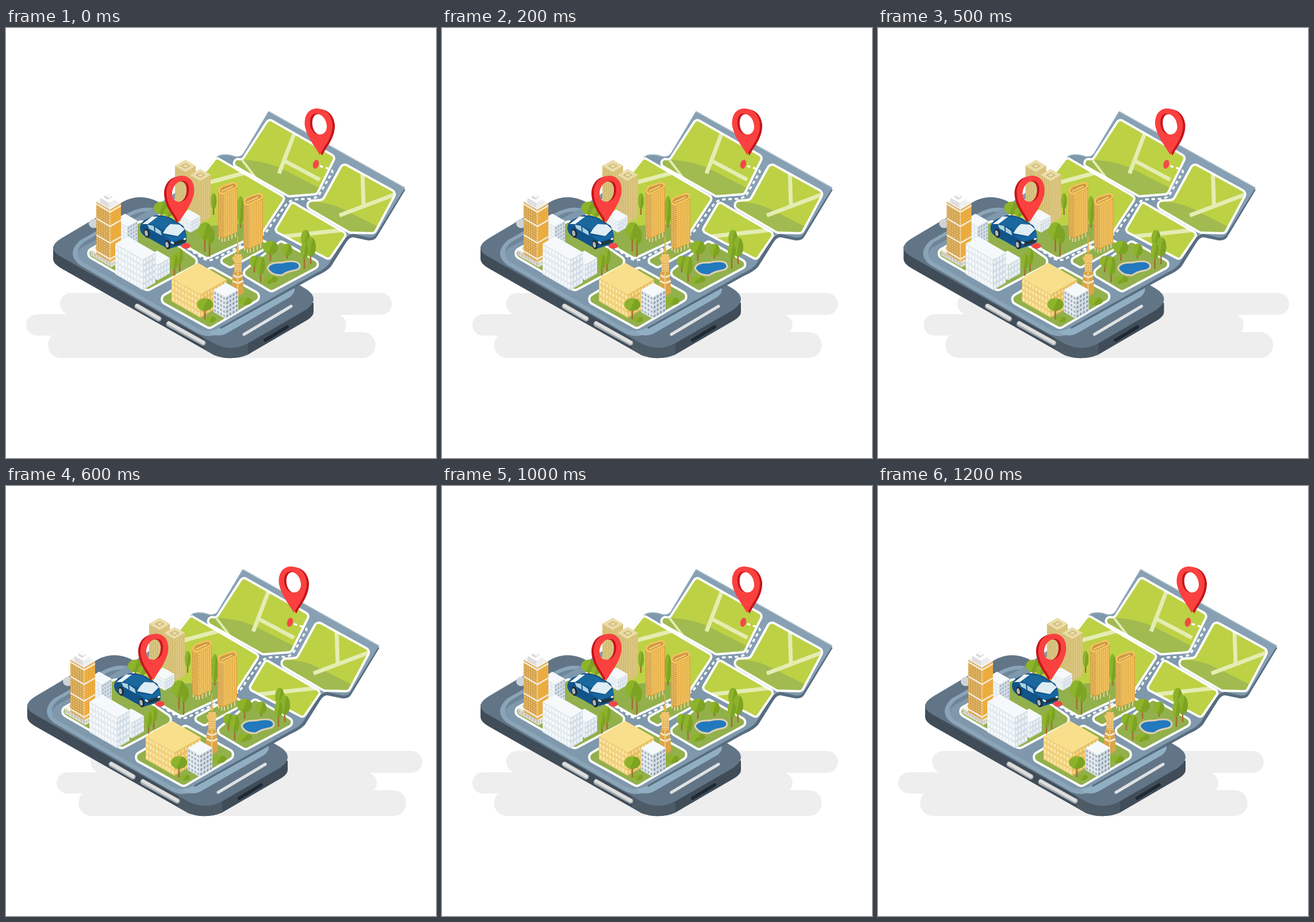
Animation of 748 by 748 pixels, one loop 1300 ms. Source, as an HTML page with a canvas:

```html
<!DOCTYPE html>
<html lang="en">
<head>
<meta charset="utf-8">
<title>City map on a phone</title>
<style>
html, body { margin: 0; width: 100%; height: 100%; overflow: hidden; background: #fff; }
canvas { display: block; width: 748px; height: 748px; }
</style>
</head>
<body>
<canvas width="748" height="748"></canvas>
<script>
const c = document.querySelector('canvas').getContext('2d');
const ISO = 0.577;
const LIME = '#bdd145', SHADE = '#a1bb50', GROUND = '#92b04c', PALE = '#e4edb2', ROAD = '#7f98ab';

function fill(d, color) {
  c.fillStyle = color;
  c.fill(new Path2D(d), 'evenodd');
}

function line(d, color, width, dash = []) {
  c.strokeStyle = color;
  c.lineWidth = width;
  c.setLineDash(dash);
  c.stroke(new Path2D(d));
  c.setLineDash([]);
}

function oval(x, y, rx, ry, color, turn = 0) {
  c.beginPath();
  c.ellipse(x, y, rx, ry, turn, 0, 7);
  c.fillStyle = color;
  c.fill();
}

// Polygon with rounded corners and an optional outline; extras are drawn inside it
function poly(points, color, r = 0, edge, extras) {
  const p = points.split(' ').map(s => s.split(',').map(Number));
  const last = p[p.length - 1];
  const path = new Path2D();
  path.moveTo((last[0] + p[0][0]) / 2, (last[1] + p[0][1]) / 2);
  p.forEach((q, i) => path.arcTo(...q, ...p[(i + 1) % p.length], r));
  path.closePath();
  c.fillStyle = color;
  c.fill(path);
  if (extras) {
    c.save();
    c.clip(path);
    extras();
    c.restore();
  }
  if (edge) {
    c.strokeStyle = edge;
    c.lineWidth = 4;
    c.stroke(path);
  }
}

// Skewed wall with a regular grid of windows
function wall(x, y, w, h, slope, color, cols, rows, glass, fx = 0.55, fy = 0.55) {
  c.save();
  c.transform(1, slope, 0, 1, x, y);
  c.fillStyle = color;
  c.fillRect(0, 0, w, h);
  c.fillStyle = glass;
  const dx = w / cols, dy = h / rows;
  for (let i = 0; i < cols; i++)
    for (let j = 0; j < rows; j++)
      c.fillRect((i + (1 - fx) / 2) * dx, (j + (1 - fy) / 2) * dy, dx * fx, dy * fy);
  c.restore();
}

// Block whose nearest top corner is at x, y
function block(x, y, a, b, h, [roof, left, right], grid, glass) {
  wall(x - a, y - a * ISO, a, h, ISO, left, grid[0], grid[2], glass[0]);
  wall(x, y, b, h, -ISO, right, grid[1], grid[2], glass[1]);
  poly(`${x},${y} ${x - a},${y - a * ISO} ${x - a + b},${y - (a + b) * ISO} ${x + b},${y - b * ISO}`, roof);
}

function tree(x, y, rx, ry, trunk = 0) {
  if (trunk) line(`M${x} ${y}V${y + ry + trunk}`, '#a56b30', 2.5);
  oval(x, y, rx, ry, '#8db32b');
  c.beginPath();
  c.ellipse(x, y, rx, ry, 0, -1.2, 1.9);
  c.fillStyle = '#7da323';
  c.fill();
}

function pin(x, y, flip) {
  const shape = 'M0 0C-6 -14 -23 -30 -22 -54C-20 -72 -8 -81 6 -81C22 -80 28 -66 26 -50C22 -30 8 -14 0 0Z' +
    'M-12 -51C-13 -36 1 -32 10 -39C20 -47 20 -72 7 -72C-4 -72 -11 -62 -12 -51Z';
  c.save();
  c.translate(x, y);
  c.scale(flip, 1);
  c.translate(-4, 1);
  fill(shape, '#c4161c');
  c.translate(4, -1);
  fill(shape, '#fb413f');
  c.restore();
}

function clouds() {
  c.fillStyle = '#eee';
  for (const [x, y, w, h] of [[94, 461, 577, 38], [35, 498, 557, 37], [73, 529, 570, 45]]) {
    c.beginPath();
    c.roundRect(x, y, w, h, h / 2);
    c.fill();
  }
}

function phone() {
  fill('M82 380V402Q82 410 96 418L362 569Q392 580 421 568L524 508Q535 501 535 494V478Z', '#404d59');
  fill('M345 540V559L362 569Q392 580 421 568V549Q392 564 362 549Z', '#4d5b66');
  fill('M96 366L204 302Q232 287 262 301L522 454Q548 471 522 490L420 549Q392 564 362 549L96 398Q68 383 96 366Z', '#627587');
  fill('M128 370L212 322Q245 304 275 320L500 452L372 531Q352 541 332 530L128 412Q104 393 128 370Z', '#8ba5b8');
  fill('M136 372L214 328Q245 311 275 326L480 452L350 526L136 406Q114 390 136 372Z', '#6f8598');
  oval(153, 340, 9, 8, '#cfd4d8');
  c.lineCap = 'round';
  line('M228 484L266 506M283 515L343 548', '#a7acb0', 9);
  line('M228 483L266 505M283 513L343 547', '#dededd', 6);
  line('M414 533L496 484', '#dfe1e2', 5);
  line('M451 543L489 520', '#1e2934', 6);
  c.lineCap = 'butt';
}

function sheet() {
  fill('M352 528L500 448Q506 458 494 468L384 531Q366 540 352 528Z', '#91afc2');
  line('M692 280L643 361Q639 368 628 366L604 361Q596 361 590 370L563 413Q556 421 540 428L372 521', '#576c80', 6);
  fill('M132 382L250 317L345 252Q360 228 372 222Q385 219 398 224Q409 226 414 218L457 145L694 278L643 360Q638 366 628 364L604 358Q593 358 588 367L561 411Q555 419 540 426L372 521Q352 532 334 523L132 406Q118 394 132 382Z', ROAD);
  fill('M414 218L457 145L694 278L643 360Z', '#87a0b3');
  line('M457 145L694 278', '#b4c3cd', 1.5);
  line('M457 146L414 218Q409 226 398 224Q385 219 372 222Q360 228 345 252', '#8fa8ba', 2);

  poly('457,158 573,224 541,289 492,293 368,223 411,229', LIME, 7, '#fff', () => {
    fill('M360 222L411 229Q455 232 482 246L545 278V300H492Z', SHADE);
    line('M501 185L475 253M484 231L546 264', PALE, 7);
    line('M411 230L437 264', PALE, 4);
  });
  poly('586,235 679,286 641,357 598,356 506,302 551,299', LIME, 8, '#fff', () => {
    fill('M506 302L545 303Q570 306 590 317L648 346V360H598Z', SHADE);
    line('M620 248L622 310M675 290L580 326', PALE, 7);
  });
  poly('366,225 486,295 446,356 350,401 322,385 262,330 345,252', LIME, 6, '#fff', () => {
    fill('M262 330L340 345L440 338L446 356L350 401L322 385Z', GROUND);
    line('M345 271L415 252', PALE, 7);
  });
  poly('497,302 593,358 562,403 467,353', LIME, 6, '#fff', () => line('M470 364L590 351', PALE, 7));

  poly('478,370 551,411 462,459 408,427', GROUND, 8, '#fff');
  poly('368,405 440,366 462,378 390,417', GROUND, 6, '#fff');
  poly('134,392 236,335 340,407 246,457', GROUND, 9, '#fff');
  poly('262,472 357,416 449,467 354,523', GROUND, 9, '#fff');
  line('M316 383L343 401Q352 406 362 402L446 360Q456 353 462 341L486 309Q493 299 506 298L530 297Q541 296 546 288L568 250Q567 246 562 245L546 240', '#fff', 3.5, [6, 5]);

  const pond = 'M455 418Q458 407 480 408Q508 402 511 413Q512 420 500 422Q488 424 480 430Q462 431 455 418Z';
  fill(pond, '#2279bd');
  line(pond, '#ddd0b4', 3);
}

function car() {
  fill('M233 347Q234 338 243 333L260 326Q275 325 288 331L308 344Q315 354 314 371L311 376L284 384Q275 381 262 373L240 361Q233 356 233 347Z', '#12548a');
  fill('M256 331Q270 325 284 332L303 343L286 343L274 351L250 340Z', '#1b689f');
  fill('M237 341L254 328L264 328L247 341Z', '#eef5f8');
  fill('M273 357Q278 347 286 341L302 342L311 350L299 362Z', '#dfedf4');
  fill('M246 342L256 344L269 353L271 361L249 349Z', '#acd2e1');
  line('M258 344L259 354', '#12548a', 2);
  fill('M272 360L299 363L312 353L314 364L290 372Z', '#1767a2');
  for (const [x, y] of [[245, 357], [281, 377]]) {
    oval(x, y, 5, 8, '#202a32', -0.2);
    oval(x - 1, y, 2.7, 5, '#aeb8be', -0.2);
  }
  fill('M290 373L312 367L311 373L291 379Z', '#213641');
  line('M287 372L292 375M309 368L313 366', '#f2f5e8', 3);
}

function skyscraper() {
  block(183, 407, 36, 7, 9, ['#f7f5ee', '#dedbd3', '#ece9e2'], [7, 2, 1], ['#c6c1b6', '#c6c1b6']);
  block(181, 316, 24, 19, 91, ['#f3f1ee', '#d3a04a', '#e8a636'], [6, 5, 21], ['#e6c27b', '#f0ba58']);
  for (const y of [320, 345, 374, 402]) line(`M157 ${y - 14}L181 ${y}L200 ${y - 11}`, '#f5eee1', 2.5);
  line('M181 316V406', '#fae3b5', 1);
  block(179, 304, 15, 12, 9, ['#fff', '#dedede', '#eee'], [1, 1, 1], ['#dedede', '#eee']);
  block(178, 295, 7, 6, 4, ['#fafafa', '#d7d7d7', '#e8e8e8'], [1, 1, 1], ['#d7d7d7', '#e8e8e8']);
}

function slab(x, y) {
  c.save();
  c.translate(x, y);
  line('M2 92V100M7 96V104M12 94V104M18 92V102M24 88V99M30 86V96', '#e8cf9b', 2);
  fill('M0 14Q1 8 8 6L25 0Q34 -1 34 8V86L10 98Q2 97 0 92Z', '#dca13c');
  wall(10, 21, 23, 75, -0.42, '#e3a73c', 7, 22, '#f8d780', 0.62, 0.62);
  wall(1, 18, 9, 75, 0.33, '#d39c3e', 3, 22, '#f0cb80', 0.6, 0.6);
  fill('M0 15Q1 8 8 6L25 0Q34 -1 34 7Q33 11 25 14L9 21Q1 22 0 15Z', '#f4c660');
  fill('M3 15Q4 10 9 8L25 3Q31 2 31 7Q30 9 24 11L9 18Q4 19 3 15Z', '#d09a40');
  line('M6 16L26 7', '#f3cf82', 2);
  c.restore();
}

function spire() {
  line('M403 362V394', '#e0ac4c', 2);
  fill('M400 390L403 374L406 390Z', '#eab552');
  wall(397, 393, 13, 37, 0, '#e5b052', 4, 9, '#f7dfab');
  fill('M393 399L403 394L412 399L409 406H396Z', '#f0c36a');
  fill('M395 424L411 424L414 460L403 468L391 460Z', '#dba549');
  line('M395 430L403 434L412 430M394 440L403 444L413 440', '#f5ead0', 3);
  line('M403 425V467', '#f3cb7b', 2);
}

function city() {
  const white = ['#f5f9fc', '#e4ebf0', '#d4dee6'];
  const sand = ['#ebdda9', '#d0b96d', '#dfca86'];
  tree(270, 313, 13, 11, 4);
  tree(283, 320, 8, 8, 4);
  block(312, 250, 18, 18, 65, sand, [5, 5, 17], ['#e3d29a', '#cdb365']);
  block(338, 266, 18, 18, 74, sand, [5, 5, 19], ['#e3d29a', '#cdb365']);
  line('M305 240L313 236L319 240L312 244ZM331 256L339 252L345 256L338 260Z', '#c9b371', 1.5);
  tree(361, 301, 5, 14, 10);
  tree(408, 317, 6, 25, 5);
  block(321, 337, 20, 17, 19, white, [5, 4, 3], ['#f6fafc', '#eef4f8']);
  car();
  oval(313, 379, 8, 5, '#f34846');
  pin(301, 338, 1);
  slab(369, 268);
  slab(413, 287);
  tree(354, 361, 9, 15, 22);
  tree(346, 353, 12, 15, 21);
  block(211, 346, 22, 18, 38, white, [4, 4, 6], ['#f5f8fa', '#a6b4c0']);
  skyscraper();
  block(264, 412, 22, 21, 27, white, [5, 4, 3], ['#f6f9fb', '#eef3f7']);
  block(238, 403, 48, 22, 53, white, [9, 4, 5], ['#fbfdfe', '#f2f6f9']);
  tree(302, 397, 6, 14, 12);
  tree(293, 406, 6, 14, 11);
  tree(489, 386, 9, 11, 4);
  tree(460, 382, 13, 12, 11);
  tree(432, 406, 9, 10, 9);
  tree(443, 413, 8, 16, 13);
  tree(521, 366, 8, 15, 20);
  tree(530, 381, 9, 17, 13);
  tree(519, 388, 7, 14, 17);
  tree(461, 437, 12, 6);
  tree(456, 441, 7, 4);
  spire();
  block(338, 464, 50, 46, 40, ['#f9df8b', '#f1d079', '#e7bd62'], [9, 8, 4], ['#fbe9ae', '#f7dc91']);
  tree(416, 475, 12, 7);
  block(382, 468, 21, 22, 38, ['#f5f9fc', '#e5ebf0', '#d5dee6'], [4, 4, 5], ['#a3b0bc', '#8c9dac']);
  tree(356, 507, 9, 5);
  line('M346 492L338 483M347 492L355 483', '#a56b30', 2);
  tree(346, 481, 14, 11, 15);
}

function draw(now) {
  const step = Math.floor(now % 1300 / 100);
  const k = 6 - Math.abs(6 - step);
  c.clearRect(0, 0, 748, 748);
  c.save();
  c.translate(8.85 * k, 0);
  clouds();
  c.restore();
  c.save();
  c.translate(-7.5 * k, 0);
  phone();
  sheet();
  city();
  oval(539, 237, 5, 8, '#f34846', 0.25);
  pin(546, 221, -1);
  c.restore();
}

const start = performance.now();
function frame() {
  draw(performance.now() - start);
  requestAnimationFrame(frame);
}
frame();
</script>
</body>
</html>
```
